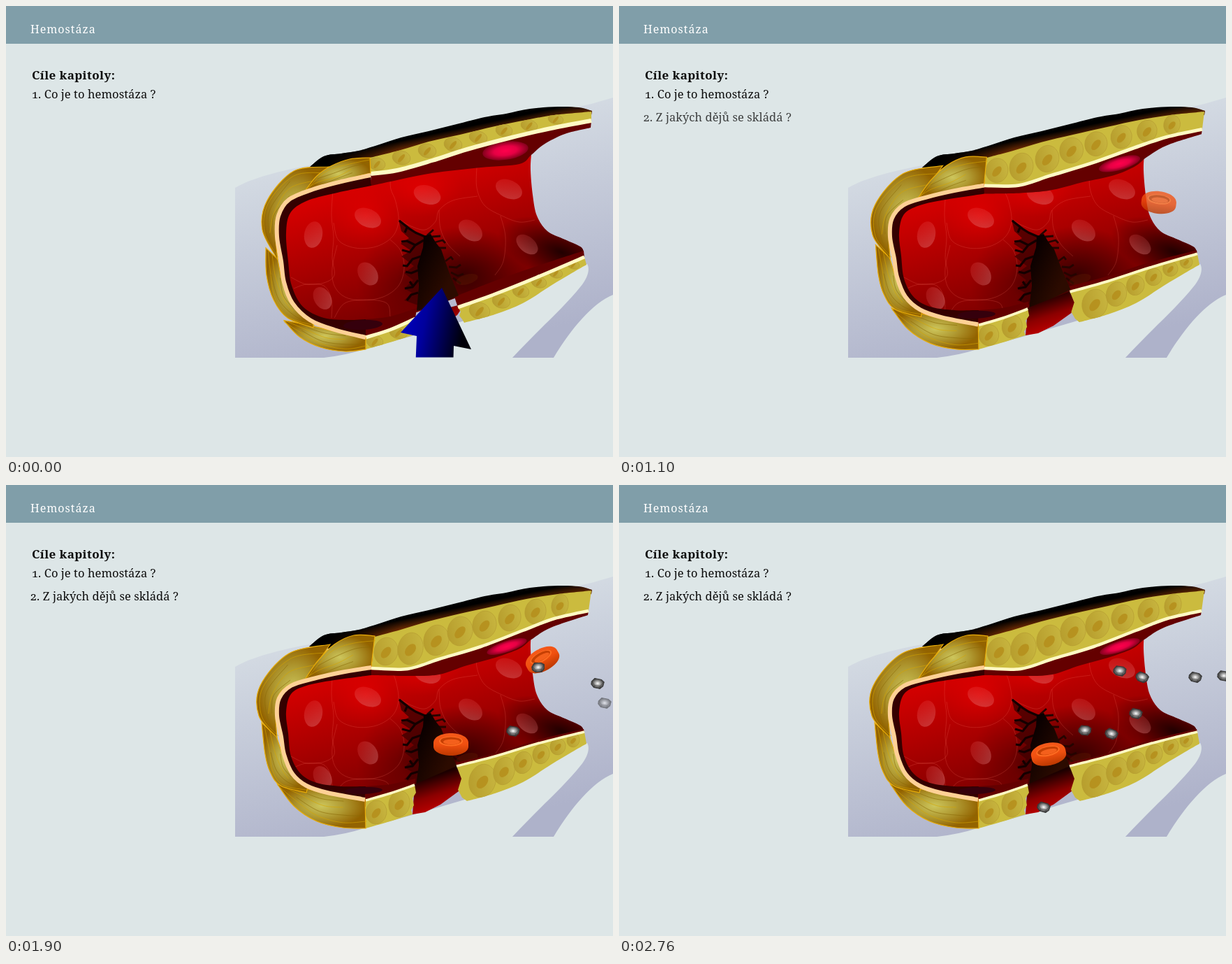
Write an HTML page that moves like this. It is 869x645 px and loops after 8 s.

```html
<!DOCTYPE html>
<html lang="cs">
<head>
<meta charset="utf-8">
<title>Hemostáza</title>
<style>
  html, body { margin: 0; width: 100%; height: 100%; overflow: hidden; background: #dde6e7; }
  svg { display: block; width: 100%; height: 100%; }
  text { font-family: "Noto Serif", "Liberation Serif", serif; font-size: 16.5px; letter-spacing: .07px; font-variant-numeric: oldstyle-nums; fill: #0c0c0c; }
  .title { font-size: 16px; letter-spacing: 1px; font-weight: 500; fill: #fff; }
  .bold { font-size: 17px; letter-spacing: .4px; font-weight: 700; }
</style>
</head>
<body>
<svg viewBox="0 0 869 645">
  <defs>
    <linearGradient id="tissue" gradientUnits="userSpaceOnUse" x1="560" y1="190" x2="628" y2="495">
      <stop stop-color="#d4dbe3"/><stop offset="1" stop-color="#aeb2ca"/>
    </linearGradient>
    <linearGradient id="shell" gradientUnits="userSpaceOnUse" x1="64" y1="298" x2="68" y2="317">
      <stop stop-color="#000"/><stop offset="1" stop-color="#963a04"/>
    </linearGradient>
    <linearGradient id="shellEnds" gradientUnits="userSpaceOnUse" x1="460" y1="0" x2="839" y2="0">
      <stop stop-color="#000"/><stop offset=".28" stop-color="#000" stop-opacity="0"/>
      <stop offset=".8" stop-color="#000" stop-opacity="0"/><stop offset="1" stop-color="#000" stop-opacity=".3"/>
    </linearGradient>
    <linearGradient id="lumen" gradientUnits="userSpaceOnUse" x1="540" y1="250" x2="595" y2="440">
      <stop stop-color="#d60000"/><stop offset="1" stop-color="#760000"/>
    </linearGradient>
    <radialGradient id="shade">
      <stop stop-color="#000" stop-opacity=".75"/><stop offset="1" stop-color="#000" stop-opacity="0"/>
    </radialGradient>
    <radialGradient id="glow">
      <stop stop-color="#f00000" stop-opacity=".55"/><stop offset="1" stop-color="#e00000" stop-opacity="0"/>
    </radialGradient>
    <linearGradient id="nucleus" x2=".6" y2="1">
      <stop stop-color="#ff7070" stop-opacity=".12"/><stop offset="1" stop-color="#e89090" stop-opacity=".34"/>
    </linearGradient>
    <radialGradient id="muscle">
      <stop stop-color="#cdc65c"/><stop offset=".5" stop-color="#b09a32"/><stop offset="1" stop-color="#936300"/>
    </radialGradient>
    <linearGradient id="cell" x1="0" y1=".8" x2="1" y2=".2">
      <stop stop-color="#b69c2c"/><stop offset="1" stop-color="#c8b640"/>
    </linearGradient>
    <radialGradient id="pink">
      <stop stop-color="#ff004c"/><stop offset=".5" stop-color="#e60044"/><stop offset="1" stop-color="#84001c"/>
    </radialGradient>
    <linearGradient id="split" gradientUnits="userSpaceOnUse" x1="484" y1="0" x2="540" y2="0">
      <stop stop-color="#35000c"/><stop offset=".52" stop-color="#4c0018"/>
      <stop offset=".52" stop-color="#ff0048"/><stop offset="1" stop-color="#c00030"/>
    </linearGradient>
    <linearGradient id="tear" gradientUnits="userSpaceOnUse" x1="590" y1="360" x2="640" y2="385">
      <stop stop-color="#0a0000"/><stop offset="1" stop-color="#2c0b00"/>
    </linearGradient>
    <linearGradient id="chunk" gradientUnits="userSpaceOnUse" x1="608" y1="417" x2="622" y2="460">
      <stop stop-color="#1c0000"/><stop offset=".6" stop-color="#8c0000"/><stop offset="1" stop-color="#b40000"/>
    </linearGradient>
    <linearGradient id="arrow" gradientUnits="userSpaceOnUse" x1="575" y1="450" x2="655" y2="465">
      <stop stop-color="#0000b8"/><stop offset=".3" stop-color="#00009c"/><stop offset="1" stop-color="#000008"/>
    </linearGradient>
    <linearGradient id="blood" x2="0" y2="1">
      <stop stop-color="#f4591a"/><stop offset=".5" stop-color="#f05010"/><stop offset="1" stop-color="#bc3800"/>
    </linearGradient>
    <radialGradient id="steel" cx=".5" cy=".48">
      <stop stop-color="#fff"/><stop offset=".35" stop-color="#b4b4b4"/><stop offset="1" stop-color="#343434"/>
    </radialGradient>
    <clipPath id="stage"><path d="M328 0H869V502.5H328Z"/></clipPath>
    <g id="red">
      <path d="M-25-2C-25-11-13-16 0-16S25-11 25-2V3C25 11 13 16 0 16S-25 11-25 3Z" fill="url(#blood)"/>
      <ellipse cy="-4.500" rx="17" ry="7" fill="#ff6c22"/>
      <ellipse cy="-5" rx="15" ry="5.500" fill="#c64004"/>
      <ellipse cx="1" cy="-3.500" rx="12" ry="3.800" fill="#f4601c"/>
    </g>
    <g id="platelet">
      <path d="M-9-2 -5-7 5-6 9-3 8 3 4 7 -5 6 -9 2Z" fill="url(#steel)" stroke="#3a3a3a" stroke-linejoin="round"/>
      <path d="M-8-2 -4 3 4 3 8-2M-4 3V6M4 3V6" fill="none" stroke="#333" stroke-width=".7" opacity=".6"/>
    </g>
  </defs>
  <rect width="869" height="645" fill="#dde6e7"/>
  <rect width="869" height="54" fill="#809ea9"/>
  <text class="title" x="35" y="38.500">Hemostáza</text>
  <text class="bold" x="37" y="105">Cíle kapitoly:</text>
  <text x="36.500" y="132">1. Co je to hemostáza ?</text>
  <text id="second" x="34.500" y="165">2. Z jakých dějů se skládá ?</text>
  <path fill="url(#tissue)" d="M328 260C350 247 390 236 434 228L838 140 869 131V413C840 425 810 460 784 503H725C760 465 800 430 822 402 834 388 836 375 832 369L780 380 660 449 585 471 515 490Q490 499 455 503H328Z"/>
  <g id="vessel"></g>
  <g id="flow"></g>
</svg>
<script>
const STEP = 200 / 3, START = 500, LOOP = 8000, LAST = 35, SQUEEZE = 13;
const $ = id => document.getElementById(id);
const parse = s => s.split(' ').map(p => p.split(',').map(Number));
const mix = (a, b, k) => a.map((p, i) => p.map((v, j) => v + (b[i][j] - v) * k));

// Smooth open curve through points
function curve(p, start = 'M') {
  let d = start + p[0];
  for (let i = 0; i < p.length - 1; i++) {
    const a = p[i - 1] || p[i], b = p[i], c = p[i + 1], e = p[i + 2] || c;
    d += `C${b.map((v, j) => v + (c[j] - a[j]) / 6)} ${c.map((v, j) => v - (e[j] - b[j]) / 6)} ${c}`;
  }
  return d;
}
const between = (a, b) => curve(a) + curve([...b].reverse(), 'L') + 'Z';
const fill = (d, color, more = '') => `<path d="${d}" fill="${color}" ${more}/>`;
const line = (d, color, w, more = '') => `<path d="${d}" fill="none" stroke="${color}" stroke-width="${w}" ${more}/>`;
const oval = ([x, y, rx, ry, rot = 0], color, more = '') =>
  `<ellipse rx="${rx}" ry="${ry}" transform="translate(${x} ${y}) rotate(${rot})" fill="${color}" ${more}/>`;

// Each edge: relaxed, contracted
const edges = {
  top: ['521,217 565,206 605,194 650,184 700,172 745,163 785,156 838,151', '528,217 565,207 605,195 650,184 700,173 745,163 790,156 838,151'],
  creamTop: ['522,240 560,235 610,221 660,205 720,189 780,175 838,164', '523,262 575,263 620,249 680,231 740,208 785,191 834,180'],
  bandTop: ['523,257 560,249 610,239 680,231 735,226 752,213 770,198 800,183 837,174', '523,272 580,273 620,271 660,258 700,247 735,234 752,221 780,204 833,186'],
  inner: ['523,257 470,268 430,279 407,296 401,325 404,365 409,400 425,430 455,446 490,449 515,448', '523,272 470,279 430,287 408,299 401,325 404,355 408,388 422,413 445,426 480,431 515,431'],
  creamLeft: ['522,242 480,251 440,262 405,277 390,300 388,330 394,365 398,395 410,425 435,449 470,463 515,474', '523,261 480,268 440,277 408,287 391,305 388,330 394,360 398,385 410,413 430,430 460,440 514,450'],
  bandLow1: ['515,448 550,444 588,432', '515,431 550,428 586,420'],
  creamLow1: ['515,474 550,463 586,447', '515,451 550,441 585,429'],
  low1: ['515,491 550,481 582,471', '515,491 550,481 582,471'],
  bandLow2: ['642,416 700,393 760,372 827,350', '640,398 700,384 760,365 827,349'],
  creamLow2: ['647,431 700,412 760,388 828,359', '645,402 700,388 760,370 828,353'],
  low2: ['656,453 700,441 740,425 780,400 810,382 831,370', '660,452 700,441 740,425 780,400 810,382 831,370'],
  gap1: ['586,447 588,452 583,457 585,462 580,467 582,471', '585,429 587,440 582,448 584,458 580,465 582,471'],
  gap2: ['647,431 651,437 649,443 653,448 656,453', '645,402 652,420 647,436 653,447 660,452'],
  tear: ['598,329 608,326 615,338 623,348 634,380 648,414 618,428 588,436 591,400 589,372 597,345', '598,329 608,326 615,338 623,348 634,376 646,403 618,417 587,430 591,400 589,372 597,345'],
  chunk: ['586,444 647,428 650,436 646,442 622,458 600,468 582,471', '585,428 645,402 653,420 648,438 622,457 600,468 582,471'],
  topCells: ['531,226,12,9 566,217,13,10 603,207,13,10 640,198,13,10 676,188,13,9 713,178,12,9 749,171,12,8 787,162,11,7', '544,238,17,20 579,234,18,23 616,222,18,22 650,209,18,21 685,200,17,20 721,190,16,19 758,181,15,18 793,172,12,16'],
  low1Cells: ['528,480,12,9 562,467,13,9', '530,468,15,17 563,456,15,19'],
  low2Cells: ['678,436,15,12 709,422,13,10 737,408,12,9 763,395,11,8 787,382,10,7 812,370,9,6', '682,423,19,24 713,409,15,20 740,397,13,16 766,385,12,14 790,374,11,12 812,365,9,10'],
  pinks: ['715,207,33,13,-8 511,456,28,7,-3', '717,231,30,8,-18 512,437,27,5,-2'],
  lobeD: ['398,450 420,473 450,488 485,494 515,491', '388,427 412,459 445,481 482,490 515,491'],
  lobeDin: ['400,450 432,456 460,463 488,469 515,474', '390,428 425,433 455,441 485,446 514,450'],
  lobeC: ['372,346 373,385 383,420 403,446 440,460', '366,340 371,385 378,410 393,430 430,440'],
  lobeCin: ['389,362 394,388 402,413 417,434 440,455', '387,359 395,383 402,401 413,417 432,432'],
  lobeB: ['462,230 412,236 374,278 367,320 389,363', '464,228 405,241 364,287 362,330 388,361'],
  lobeBin: ['432,263 402,278 387,303 386,330 389,363', '430,277 405,286 389,303 386,328 388,361'],
  lobeA: ['430,262 445,243 465,229 492,219 521,217', '428,278 446,252 470,228 498,215 528,216'],
  lobeAin: ['430,263 450,258 475,251 498,245 522,239', '428,279 450,274 475,268 498,263 523,259']
};
for (const k in edges) edges[k] = edges[k].map(parse);

const shellPath = curve(parse('434,231 455,215 480,211 505,207 535,198 566,188 605,179 645,169 685,159 716,154 750,147 790,144 820,145 839,150')) + 'L838 156 700 180 521 222 460 234Z';
const lumenPath = curve(parse('752,212 751,235 754,270 760,300 775,322 800,334 822,344 827,351')) +
  'L760 378 648 416 588 438 515 460 470 456 425 440 402 395 396 330 400 296 430 272 523 248 680 226Z';
const borders = [
  '468,262 466,300 469,330 467,360 470,385 455,396 430,398 408,388',
  '469,310 476,335 500,346 530,344 553,330 562,308 558,280 551,262 550,245',
  '474,342 467,375 470,400 485,416 510,421 540,416 562,400 570,375 565,350 550,334',
  '562,305 580,315 600,320 615,308 620,292 640,278 675,272',
  '674,230 674,260 685,285 710,300 735,309 757,306',
  '620,292 622,318 632,340 650,358', '708,300 715,330 712,365 700,385',
  '412,404 430,398 455,400 466,420 466,446', '470,446 485,425 515,420 545,425 550,444'
].map(s => line(curve(parse(s)), '#ff7a6a', 1, 'opacity=".22"')).join('');
const nuclei = parse('440,327,13,19,10 518,303,20,13,25 603,270,20,13,20 720,262,20,13,25 518,383,13,18,-35 665,321,19,13,38 746,341,18,11,40 453,418,12,17,-30')
  .map(e => oval(e, 'url(#nucleus)')).join('');
const lumen = fill(lumenPath, 'url(#lumen)') +
  oval([515, 300, 55, 50], 'url(#glow)') + oval([595, 262, 60, 40], 'url(#glow)') +
  `<clipPath id="inside"><path d="${lumenPath}"/></clipPath><g clip-path="url(#inside)">` +
  oval([795, 352, 95, 42, 20], 'url(#shade)') + oval([655, 385, 95, 70], 'url(#shade)', 'opacity=".8"') +
  oval([572, 395, 70, 70], 'url(#shade)', 'opacity=".35"') + '</g>' + borders + nuclei;

const ragged = fill('M562 305 574 314 589 324 600 330 596 350 591 380 590 428 570 421 581 410 570 404 583 392 570 382 584 372 566 358 580 350 565 340 577 332 566 322Z', '#430000', 'opacity=".8"');
const cracks = line('M563 307 578 319 586 324 600 330M574 317 571 324M598 335 586 342 574 336 566 337M586 342 578 352 567 349M594 358 582 362 574 372 568 371M590 378 580 382 572 380M590 392 582 402 571 404M583 401 578 394M590 410 580 413 574 421', '#140000', 3.2, 'stroke-linejoin="round"') +
  line('M603 328 612 320M610 330 622 329M614 338 625 335 629 339M620 346 630 346M629 365 637 359 640 363M634 373 645 374 651 370M637 381 647 386 655 383M640 389 651 397', '#250400', 2.8, 'stroke-linejoin="round"') +
  oval([660, 391, 16, 7, -15], '#6b2a00', 'opacity=".25"');

function cells(list, turn) {
  return list.map(([x, y, rx, ry]) => oval([x, y, rx, ry, turn], 'url(#cell)', 'stroke="#b39a30" stroke-width=".6"') +
    oval([x, y + ry * .08, rx * .55, ry * .28, -50], '#b58f1c', 'opacity=".85"')).join('');
}
function wall(id, path, list, turn) {
  return `<clipPath id="${id}"><path d="${path}"/></clipPath>` + fill(path, '#cbbb3e') +
    `<g clip-path="url(#${id})">${cells(list, turn)}</g>`;
}
function lobe(outer, inner) {
  const fibres = [.2, .4, .62, .82].map((f, i) => {
    const p = mix(outer, inner, f).map(([x, y], j) => [x + Math.sin(j * 2 + i * 2) * 2, y + Math.cos(j * 2.3 + i) * 2]);
    return line(curve(p.slice(i % 2, 5 - (i > 1))), i % 2 ? '#8a6a08' : '#d6a400', .8, 'opacity=".75"');
  });
  return fill(between(outer, inner), 'url(#muscle)', 'stroke="#e8ac08" stroke-width="1.2"') + fibres.join('');
}

function vessel(n) {
  const k = Math.min(n / SQUEEZE, 1), e = {};
  for (const name in edges) e[name] = mix(...edges[name], k);
  const top = between(e.top, e.creamTop);
  const low1 = curve(e.creamLow1) + 'L' + e.gap1.join(' ') + curve([...e.low1].reverse(), 'L') + 'Z';
  const low2 = curve([...e.creamLow2].reverse()) + 'L' + e.gap2.join(' ') + curve(e.low2, 'L') + 'Z';
  const w = 6 - 1.5 * k;
  let s = fill(shellPath, 'url(#shell)') + fill(shellPath, 'url(#shellEnds)') + lumen + ragged + cracks +
    fill(between(e.bandTop, e.creamTop), '#640000') +
    fill(between(e.bandLow1, e.creamLow1), '#640000') +
    fill(between(e.bandLow2, e.creamLow2), '#640000') +
    fill(between(e.inner, e.creamLeft), '#350000') +
    fill('M' + e.tear.join('L') + 'Z', 'url(#tear)') + fill('M' + e.chunk.join('L') + 'Z', 'url(#chunk)') +
    oval(e.pinks[0], 'url(#pink)') + oval(e.pinks[1], 'url(#split)') +
    wall('w1', top, e.topCells, 12) + wall('w2', low1, e.low1Cells, 10) + wall('w3', low2, e.low2Cells, 15) +
    line(curve(e.creamTop), '#fffac4', w) + line(curve(e.creamLow1), '#fffac4', w - 1) + line(curve(e.creamLow2), '#fffac4', w - 1);
  for (const c of 'DCBA') s += lobe(e['lobe' + c], e[`lobe${c}in`]);
  s += line(curve(e.creamLeft), '#ffd196', 6);
  const drop = n ? 6 + 12.2 * (n - 1) : 0;
  if (drop < 100) s += `<g clip-path="url(#stage)">${fill('M624 403 666 491 641 486 640 520H586L588 472 565 467Z', 'url(#arrow)', `transform="translate(0 ${drop})"`)}</g>`;
  return s;
}

// Keys: step, x, y, turn, opacity
const tracks = [
  ['red', '3,837,226,-14,0 6,810,248,-5,.38 11,763,290,10,.9 15,720,331,20,1 22,637,371,0,1 27,613,435,-30,1 29,606,462,-34,.7 31,600,488,-36,0'],
  ['red', '16,850,213,-38,0 20,796,234,-33,1 22,768,250,-29,1 27,699,291,-10,1 35,615,385,-12,1'],
  ['platelet', '10,853,191,0,0 15,817,219,8,1 22,762,261,-8,1 27,719,288,5,1 35,667,351,0,1'],
  ['platelet', '10,856,288,0,0 15,807,317,10,1 22,726,352,4,1 27,661,371,5,1 35,608,461,10,1'],
  ['platelet', '18,874,268,0,0 22,847,284,6,1 27,808,304,8,1 35,740,327,6,1'],
  ['platelet', '20,872,304,0,.2 22,857,312,6,.55 25,824,323,2,1 27,800,330,-5,1 35,705,356,15,1'],
  ['platelet', '22,860,230,0,0 27,805,242,4,1 35,717,266,2,1'],
  ['platelet', '26,830,273,0,0 27,822,274,0,.16 31,788,274,8,1 35,749,275,15,1'],
  ['platelet', '29,882,268,0,0 32,853,272,4,1 35,825,275,8,1'],
  ['platelet', '33,884,270,0,1 35,866,273,4,1']
].map(([kind, s]) => [kind, parse(s)]);

function along(keys, n) {
  if (n < keys[0][0] || n > keys[keys.length - 1][0]) return null;
  const i = Math.max(0, keys.findIndex(q => q[0] >= n) - 1);
  const a = keys[i], b = keys[i + 1], h = b[0] - a[0], u = (n - a[0]) / h;
  const slope = (j, c) => {
    const p = keys[j - 1] || keys[j], q = keys[j + 1] || keys[j];
    return (q[c] - p[c]) / (q[0] - p[0]);
  };
  return [1, 2, 3, 4].map(c => c > 2 ? a[c] + (b[c] - a[c]) * u :
    a[c] + (b[c] - a[c]) * u * u * (3 - 2 * u) + h * u * (1 - u) * ((1 - u) * slope(i, c) - u * slope(i + 1, c)));
}
function flow(n) {
  return tracks.map(([kind, keys]) => {
    const p = along(keys, n);
    return p ? `<use href="#${kind}" transform="translate(${p[0]} ${p[1]}) rotate(${p[2]})" opacity="${p[3]}"/>` : '';
  }).join('');
}

let shown = -1, pose = -1;
function draw(n) {
  if (n === shown) return;
  shown = n;
  $('second').setAttribute('opacity', Math.min(n / SQUEEZE, 1));
  if (Math.min(n, SQUEEZE) !== pose) {
    pose = Math.min(n, SQUEEZE);
    $('vessel').innerHTML = vessel(pose);
  }
  $('flow').innerHTML = flow(n);
}
const begin = performance.now();
function tick() {
  const t = (performance.now() - begin) % LOOP;
  draw(t < START ? 0 : Math.min(LAST, Math.floor((t - START + 7) / STEP) + 1));
  requestAnimationFrame(tick);
}
draw(0);
requestAnimationFrame(tick);
</script>
</body>
</html>
```
